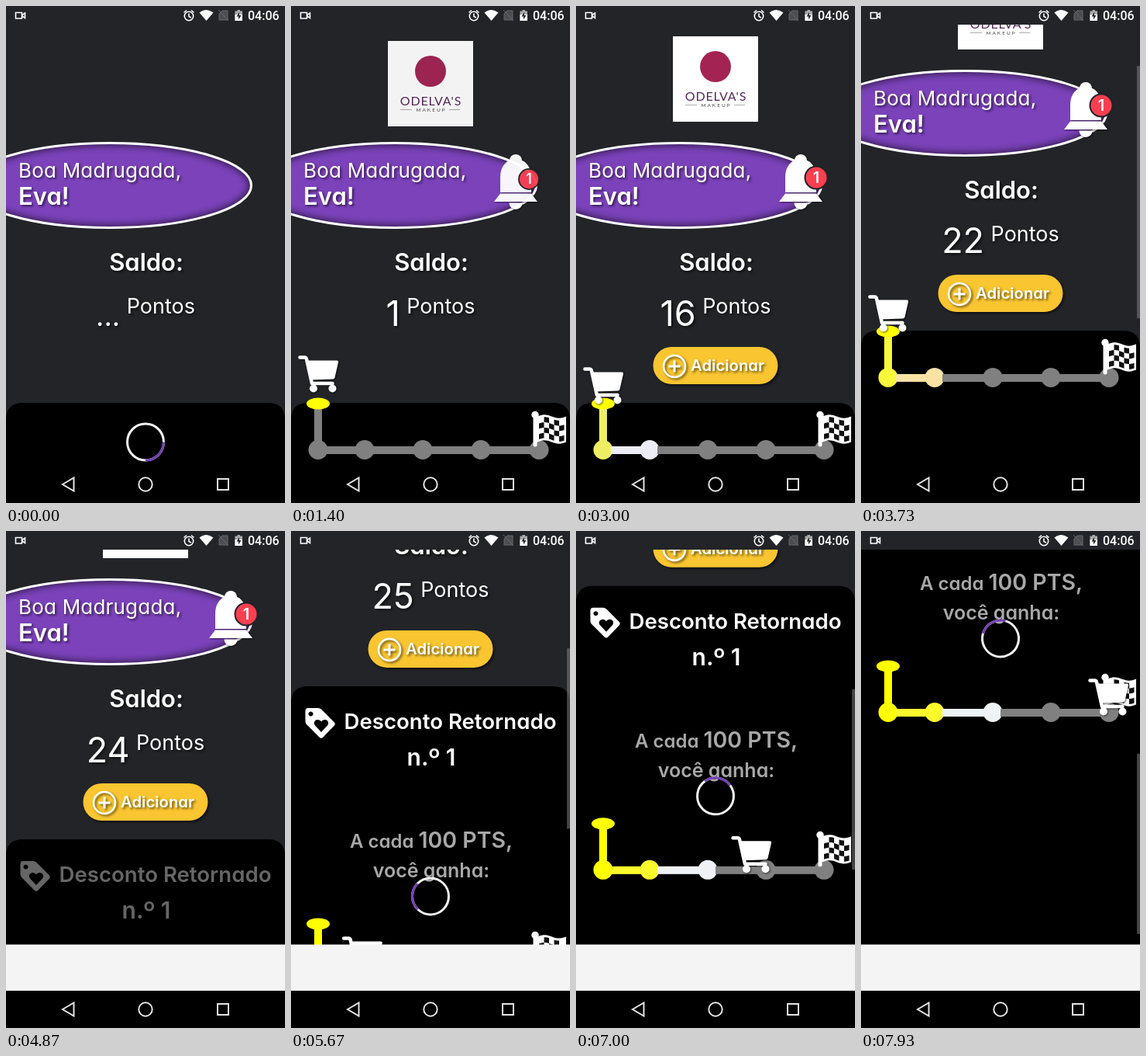
Animation of 360x640 px, one loop 8000 ms. Source, as an HTML page:

```html
<!DOCTYPE html>
<html lang="pt">
<head>
<meta charset="utf-8">
<style>
html, body { margin: 0; width: 100%; height: 100%; overflow: hidden; background: #222428; }
svg { display: block; width: 360px; height: 640px; }
text { font-family: Inter, "Open Sans", sans-serif; font-feature-settings: "cv11"; fill: #fff; }
.mid { text-anchor: middle; }
.bold { font-weight: 600; }
.shade { filter: drop-shadow(2px 2px 1.5px rgba(0, 0, 0, .55)); }
.soft { filter: drop-shadow(1px 1px 1px rgba(0, 0, 0, .6)); }
.line { fill: none; stroke: #fff; }
</style>
</head>
<body>
<svg viewBox="0 0 360 640">
  <defs>
    <clipPath id="inside"><ellipse cx="134" cy="231" rx="182.5" ry="54.5"/></clipPath>
    <filter id="blur" x="-20%" y="-40%" width="140%" height="180%"><feGaussianBlur stdDeviation="5"/></filter>
    <g id="ring" fill="none" stroke-width="3">
      <circle r="23.5" stroke="#f3f3f3"/>
      <path d="M16.6-16.6A23.5 23.5 0 0 1 16.6 16.6" stroke="#7441b4"/>
    </g>
  </defs>
  <rect width="360" height="640" fill="#222428"/>

  <g id="page">
    <g id="logo">
      <rect x="125" width="110" height="110" fill="#fff"/>
      <circle cx="180" cy="39" r="20" fill="#a32453"/>
      <text class="mid" x="180.5" y="83" style="font:400 16px Lato,sans-serif;letter-spacing:.8px;fill:#562a58">ODELVA'S</text>
      <text class="mid" x="181" y="91" style="font:400 6.5px Lato,sans-serif;letter-spacing:2px;fill:#444">MAKEUP</text>
      <path d="M141 88.5h15M204 88.5h14" stroke="#999" stroke-width=".8"/>
    </g>

    <ellipse cx="134" cy="231" rx="182.5" ry="54.5" fill="#7b42ba"/>
    <g clip-path="url(#inside)">
      <ellipse cx="134" cy="231" rx="184" ry="56" fill="none" stroke="#000" stroke-opacity=".65" stroke-width="9" filter="url(#blur)"/>
    </g>
    <ellipse cx="134" cy="231" rx="182.5" ry="54.5" class="line" stroke-width="3"/>
    <g class="shade">
      <text x="16" y="221" font-size="26" letter-spacing=".2">Boa Madrugada,</text>
      <text class="bold" x="16" y="256" font-size="31">Eva!</text>
      <text class="mid bold" x="181" y="341" font-size="31">Saldo:</text>
      <text class="mid" x="180" y="411.5"><tspan id="count"></tspan><tspan dx="8.5" dy="-15.5" font-size="27">Pontos</tspan></text>
    </g>

    <g id="bell">
      <g fill="#fff" class="soft">
        <circle cx="290" cy="199" r="8"/>
        <path d="M270 240V220C270 206 279 197 290 197S310 206 310 220V240Z"/>
        <path d="M270 241.5H310L318 252H262Z"/>
        <path d="M281.5 253.5H298.5A8.5 8.5 0 0 1 281.5 253.5Z"/>
      </g>
      <g id="badge">
        <circle r="15.5" fill="#222428"/>
        <circle r="13.5" fill="#fa3f50"/>
        <text class="mid bold" y="7" font-size="20">1</text>
      </g>
    </g>

    <g id="button">
      <rect x="99.5" y="439" width="161" height="48" rx="24" fill="#f9c530" class="shade"/>
      <g class="shade">
        <circle cx="127" cy="464" r="14" class="line" stroke-width="2.6"/>
        <path d="M119.5 464h15M127 456.5v15" class="line" stroke-width="3"/>
        <text class="bold" x="148" y="470" font-size="20.3">Adicionar</text>
      </g>
    </g>

    <path d="M0 1500V533Q0 511 22 511H338Q360 511 360 533V1500Z"/>
    <use href="#ring" id="spin1"/>

    <g id="heading">
      <path fill="#fff" fill-rule="evenodd" d="M22 539H35Q37.5 539 39 540.5L55.5 557Q58 559.5 55.5 562L41.5 576.5Q39 579 36.500 576.5L20 560Q18.5 558.5 18.5 556V543Q18.5 539 22 539ZM25.500 543.5a3 3 0 1 0 .01 0ZM39 570L31 561.5C27 556.5 34 550.5 39 556.5C44 550.5 51 556.5 47 561.5Z"/>
      <text class="bold" x="68.5" y="566" font-size="27.6">Desconto Retornado</text>
      <text class="mid bold" x="181" y="613" font-size="30">n.º 1</text>
    </g>
    <g id="offer" opacity=".66">
      <text class="mid bold" x="181" y="719" font-size="24">A cada <tspan font-size="28.5">100 PTS,</tspan></text>
      <text class="mid bold" x="181" y="757" font-size="25">você ganha:</text>
    </g>
    <use href="#ring" id="spin2"/>

    <g id="track">
      <g id="road"></g>
      <ellipse cx="35" cy="-59.5" rx="15" ry="7.5" fill="#ff0"/>
      <g id="flag"></g>
      <g id="cart" class="soft" fill="#fff">
        <path d="M-23.5-45H-17.5Q-15.5-45-15-43L-8-11.5H18.5" class="line" stroke-width="4.5" stroke-linecap="round" stroke-linejoin="round"/>
        <path d="M-15-41H24Q26.5-41 26-38.5L21.5-19Q21-17 19-17L-10-16Z"/>
        <circle cx="-6" cy="-5" r="5"/>
        <circle cx="18.5" cy="-5" r="5"/>
      </g>
    </g>
  </g>

  <rect id="thumb" x="356" width="4" fill="#888"/>
  <rect id="strip" y="532.5" width="360" height="59.5" fill="#f4f4f4"/>

  <rect y="592" width="360" height="48"/>
  <g class="line" style="stroke:#e4e4e4" stroke-width="2">
    <path d="M73 616L87.5 607.5V624.5Z"/>
    <circle cx="180" cy="616" r="8.7"/>
    <rect x="273" y="609" width="14" height="14"/>
  </g>

  <rect width="360" height="24" fill="#222428"/>
  <path d="M12.5 8.5h8v7.5h-8ZM21 11.5l3.5-2.5v6.5L21 13" class="line" stroke-width="1.6"/>
  <g class="line" stroke-width="1.6">
    <circle cx="236" cy="13" r="5.7"/>
    <path d="M236 9.5V13.5L239 15M229.5 8.5L233 5.5M242.5 8.5L239 5.5"/>
  </g>
  <path d="M249.5 8.5Q258.5 1.5 267.5 8.5L258.5 19Z" fill="#fff"/>
  <path d="M279 6H286V18H275V10ZM274 5L287 19" fill="#4c4d50" stroke="#68696b"/>
  <path d="M298.5 5H302V6.5H305V19H295.5V6.5H298.5Z" fill="#aaa"/>
  <path d="M295.5 11H305V19H295.5Z" fill="#fff"/>
  <path d="M301 8L297.5 13.5H300V17.5L303.5 12H301Z" fill="#222428"/>
  <text x="312" y="18" style="font:500 16px Roboto,sans-serif">04:06</text>
</svg>

<script>
const LOOP = 8000, STEP = 1000 / 15, NS = 'http://www.w3.org/2000/svg';
const $ = id => document.getElementById(id);
const set = (id, attrs) => { for (const k in attrs) $(id).setAttribute(k, attrs[k]); };
const move = (id, x, y, extra = '') => set(id, { transform: `translate(${x} ${y}) ${extra}` });
const fade = (id, opacity) => set(id, { opacity });
const lerp = (a, b, p) => Array.isArray(a) ? a.map((v, i) => lerp(v, b[i], p)) : a + (b - a) * p;

// Linear interpolation through [time, value] stops
function key(t, ...stops) {
  if (t <= stops[0][0]) return stops[0][1];
  for (let i = 1; i < stops.length; i++) {
    const [t0, a] = stops[i - 1], [t1, b] = stops[i];
    if (t <= t1) return lerp(a, b, (t - t0) / (t1 - t0));
  }
  return stops[stops.length - 1][1];
}

function add(parent, tag, attrs) {
  const el = document.createElementNS(NS, tag);
  for (const k in attrs) el.setAttribute(k, attrs[k]);
  $(parent).appendChild(el);
  return el;
}

// Road: a post, five stops and the bars between them
const stopsX = [35, 95, 170, 245, 320];
const post = add('road', 'rect', { x: 30, y: -60, width: 10, height: 60 });
const nodes = stopsX.map(cx => add('road', 'circle', { cx, r: 12.5 }));
const bars = stopsX.slice(1).map((x, i) => {
  const from = stopsX[i] + 10;
  return add('road', 'rect', { x: from, y: -4.5, width: Math.min(x + 10, 322) - from, height: 10 });
});

// Waving chequered flag
const wave = x => -2.2 * Math.sin((x - 318) / 37 * 2 * Math.PI);
function cloth(x0, x1, y0, y1, fill) {
  const top = [], low = [];
  for (let i = 0; i <= 12; i++) {
    const x = lerp(x0, x1, i / 12);
    top.push([x, y0 + wave(x)]);
    low.unshift([x, y1 + wave(x)]);
  }
  add('flag', 'polygon', { points: top.concat(low).join(' '), fill });
}
add('flag', 'circle', { cx: 315, cy: -45, r: 4.7, fill: '#fff' });
add('flag', 'rect', { x: 312.5, y: -45, width: 5, height: 41, rx: 2, fill: '#fff' });
cloth(316, 355, -43, -10, '#fff');
for (let c = 0; c < 5; c++)
  for (let r = 0; r < 4; r++)
    if ((c + r) % 2) cloth(320 + c * 6.5, 326.5 + c * 6.5, -40 + r * 6.8, -33.2 + r * 6.8, '#111');

const GREY = [128, 128, 128], YELLOW = [255, 255, 0], PALE = [237, 238, 245];
const paint = (color, ...els) => els.forEach(el => el.setAttribute('fill', `rgb(${color.map(Math.round)})`));

function drawTrack(t) {
  fade('track', t < 1130 ? 0 : 1);
  move('track', 0, key(t, [4330, 571.5], [4800, 876.5]));
  paint(key(t, [1500, GREY], [2200, PALE], [3000, [238, 238, 98]], [3730, [247, 247, 60]], [5000, YELLOW]), post, nodes[0]);
  paint(key(t, [2200, GREY], [2800, PALE], [3000, PALE], [3730, [249, 227, 164]], [5600, [250, 249, 45]]), bars[0], nodes[1]);
  paint(key(t, [5200, GREY], [6000, PALE], [7930, [238, 243, 246]]), bars[1], nodes[2]);
  paint(GREY, bars[2], bars[3], nodes[3], nodes[4]);
  move('cart', key(t, [5110, 35], [6200, 146], [7930, 319]),
    key(t, [1400, -74], [2933, -59], [4870, -59], [5130, 4]));
}

function draw(t) {
  const scroll = key(t, [3000, 0], [3200, 12], [3733, 93], [3800, 102], [3930, 110], [4070, 114], [5070, 114],
    [5330, 205], [5600, 300], [5930, 355], [6200, 371], [6500, 380], [6800, 405], [7670, 558], [7933, 643]);
  move('page', 0, -scroll);

  move('logo', 0, 39 + 31 * Math.exp((870 - Math.max(t, 400)) * .0031));
  fade('logo', key(t, [400, 0], [1400, .95], [1600, 1]));
  fade('bell', key(t, [400, 0], [1400, .95], [1600, 1]));
  const pop = key(t, [900, 0], [1400, .9], [1600, 1]);
  move('badge', lerp(280, 310, pop), lerp(241, 221, pop), `scale(${pop})`);
  fade('button', key(t, [2000, 0], [2867, 1]));

  const points = Math.floor(key(t, [1400, 1], [2800, 16], [3000, 16], [3730, 22], [4070, 24], [5130, 24], [5930, 26]));
  $('count').textContent = t < 1330 ? '...' : points;
  set('count', { 'font-size': t < 1330 ? 36 : 45 });

  move('spin1', 180, 561.5, `rotate(${45 + t * .345})`);
  fade('spin1', t < 1130 ? 1 : 0);
  move('spin2', 180, 781.5, `rotate(${3 + (t - 6200) * .345})`);
  fade('spin2', t < 4800 ? 0 : 1);
  fade('offer', t < 4800 ? 0 : .66);
  fade('heading', key(t, [4600, 0], [4867, .4], [5070, .4], [5500, 1]));
  drawTrack(t);

  const ratio = 568 / (t < 4400 ? 993 : 1390);
  set('thumb', { y: 24 + scroll * ratio, height: 568 * ratio });
  fade('thumb', key(t, [3000, 0], [3067, .5], [4330, .5], [4600, 0], [5070, 0], [5200, .5]));
  fade('strip', t < 4390 ? 0 : 1);
}

const start = performance.now();
function tick() {
  const ms = (performance.now() - start) % LOOP;
  draw(Math.floor((ms + 5) / STEP) * STEP % LOOP);
  requestAnimationFrame(tick);
}
tick();
</script>
</body>
</html>
```
